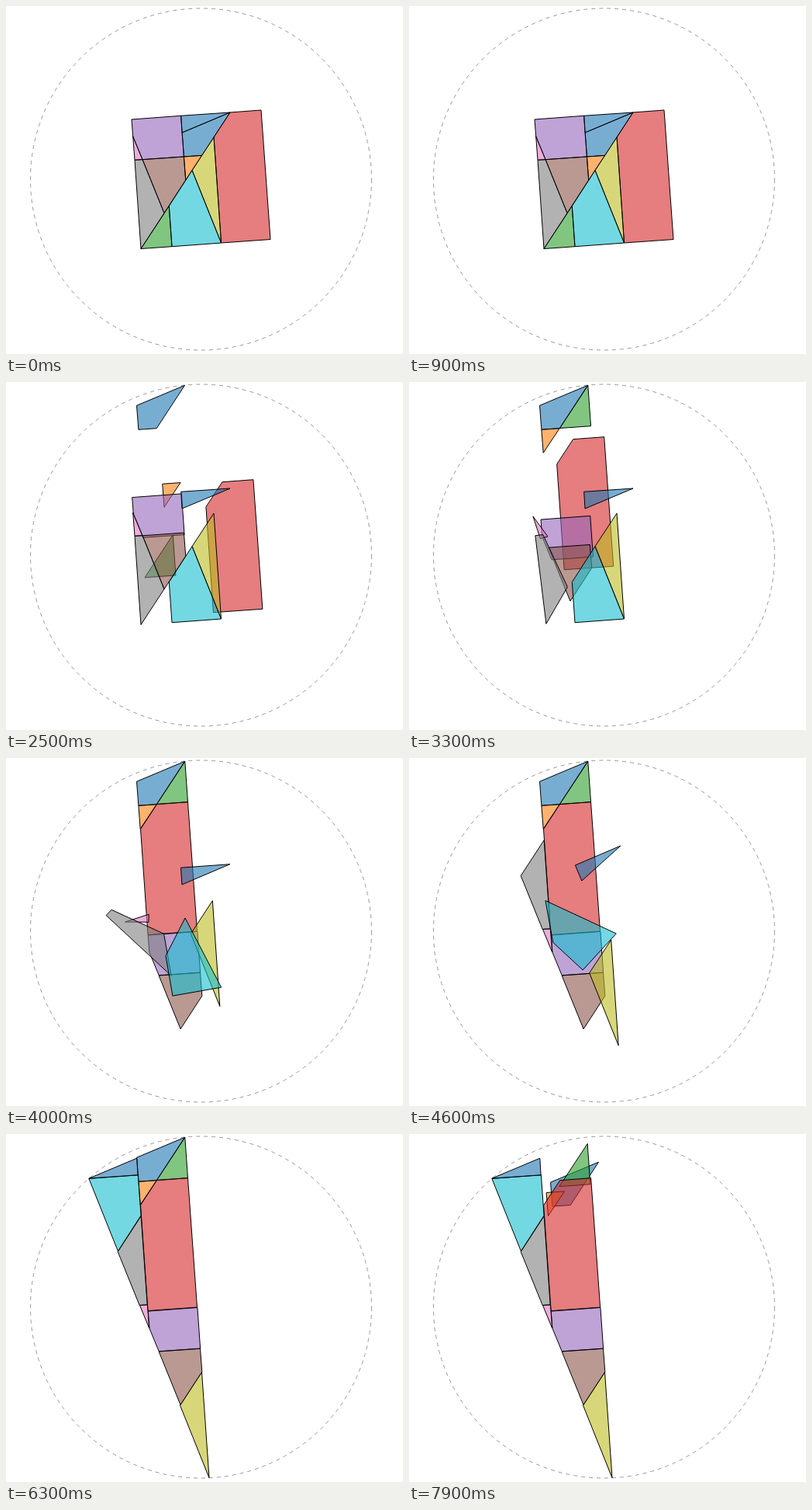
Animation, 512 px wide and 448 px high, one loop 8000 ms. Source, as an HTML page with a canvas:

```html
<!DOCTYPE html>
<html lang="en">
<head>
<meta charset="utf-8">
<title>Square to triangle dissection</title>
<style>
  html, body { margin: 0; width: 100%; height: 100%; overflow: hidden; background: #fff; }
  canvas { display: block; }
</style>
</head>
<body>
<canvas id="stage" width="512" height="448"></canvas>
<script>
const ctx = document.getElementById('stage').getContext('2d');

const LOOP = 8000, TICK = 100;
const FORWARD = 925, BACK = 6925;      // start of each pass
const STAGGER = 300, DURATION = 1500;

// Corners of the cut square
const V = {
  A: [162, 146], B: [329, 134], C: [341, 300.5], D: [174, 312.5],
  E: [225.7, 141.3], F: [289, 137], G: [227, 163], H: [252.7, 192.4],
  I: [229.4, 194], J: [231.7, 224], K: [268, 169], L: [277.5, 305],
  M: [240, 211.6], N: [210.3, 257.5], O: [214, 309.7], P: [176, 197.7],
  Q: [166, 198.3], T: [163.7, 168], U: [204, 266.6]
};

// Area centroid of a polygon
function centroid(pts) {
  let area = 0, cx = 0, cy = 0;
  pts.forEach(([x, y], i) => {
    const [u, v] = pts[(i + 1) % pts.length];
    const cross = x * v - u * y;
    area += cross;
    cx += (x + u) * cross;
    cy += (y + v) * cross;
  });
  return [cx / (3 * area), cy / (3 * area)];
}

function piece(color, corners, move, angle) {
  const pts = [...corners].map(k => V[k]);
  return { color, pts, center: centroid(pts), move, angle };
}

const slide = (color, corners, dx, dy) => piece(color, corners, [dx, dy], 0);

// Half turn that carries each point p to (sx, sy) - p
function flip(color, corners, sx, sy) {
  const p = piece(color, corners, null, -Math.PI);
  p.move = [sx - 2 * p.center[0], sy - 2 * p.center[1]];
  return p;
}

const pieces = [
  slide('31,119,180', 'FHIG', -58.5, -132.7),
  slide('255,127,14', 'IHJ', -58.5, -132.7),
  slide('44,160,44', 'DON', 20.5, -253),
  slide('214,39,40', 'FBCLK', -94.5, -77.4),
  slide('148,103,189', 'AEIPT', 21.2, 82.1),
  slide('140,86,75', 'PIJU', 21.1, 82.3),
  flip('227,119,194', 'TPQ', 348.4, 418),
  flip('127,127,127', 'QPUD', 348.2, 418.2),
  slide('188,189,34', 'KLM', -15.5, 137.7),
  flip('23,190,207', 'NMLO', 384.4, 362.4),
  flip('31,119,180', 'EFG', 395.8, 194.2)
];

function easeIn(ms) {
  const x = Math.min(1, Math.max(0, ms / DURATION));
  return 1 - Math.sqrt(1 - x * x);
}

function drawCircle() {
  ctx.setLineDash([5, 5]);
  ctx.strokeStyle = '#999';
  ctx.beginPath();
  ctx.arc(251.5, 223, 220, 0, 2 * Math.PI);
  ctx.stroke();
  ctx.setLineDash([]);
}

function drawPiece({ color, pts, center: [cx, cy], move: [dx, dy], angle }, k) {
  const cos = Math.cos(angle * k), sin = Math.sin(angle * k);
  ctx.beginPath();
  for (const [x, y] of pts) {
    const u = x - cx, v = y - cy;
    ctx.lineTo(cx + dx * k + u * cos - v * sin, cy + dy * k + u * sin + v * cos);
  }
  ctx.closePath();
  ctx.fillStyle = `rgba(${color},0.6)`;
  ctx.fill();
  ctx.strokeStyle = '#000';
  ctx.stroke();
}

function render(t) {
  ctx.fillStyle = '#fff';
  ctx.fillRect(0, 0, 512, 448);
  ctx.lineWidth = 1;
  ctx.miterLimit = 4;
  drawCircle();
  pieces.forEach((p, i) => {
    const delay = i * STAGGER;
    drawPiece(p, easeIn(t - FORWARD - delay) - easeIn(t - BACK - delay));
  });
}

function frame() {
  // Motion advances in ticks; the small lead absorbs display latency
  const t = Math.floor((performance.now() + 20) / TICK) * TICK % LOOP;
  render(t);
  requestAnimationFrame(frame);
}
frame();
</script>
</body>
</html>
```
